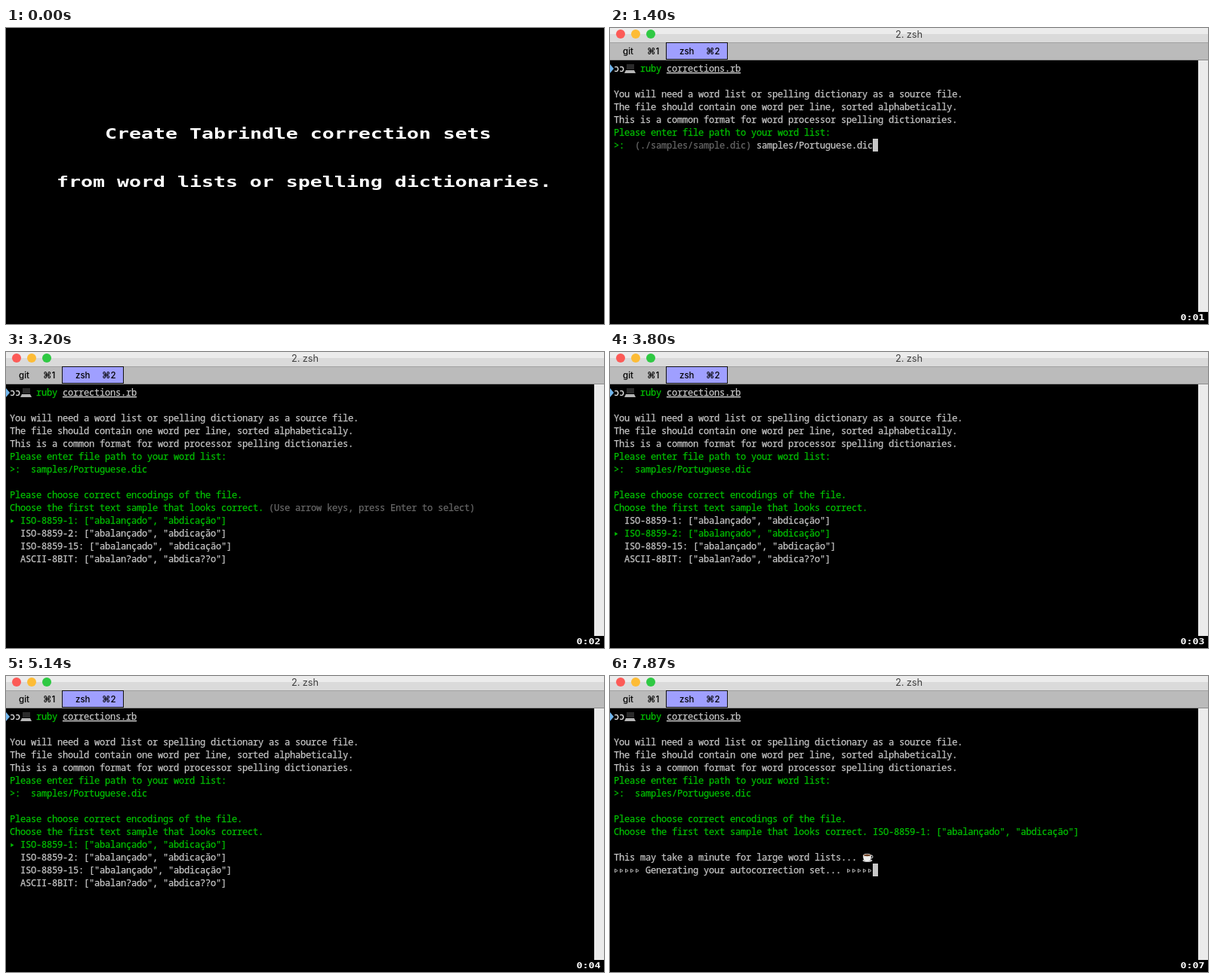
Animation, 792 px wide and 393 px high, one loop 8000 ms. Source, as an HTML page:

```html
<!DOCTYPE html>
<html lang="en">
<head>
<meta charset="utf-8">
<title>Correction sets</title>
<style>
  html, body { margin: 0; width: 100%; height: 100%; overflow: hidden; background: #000; }
  svg { display: block; width: 792px; height: 393px; }
  text { white-space: pre; }
  .mono { font: 12px "Noto Sans Mono", "DejaVu Sans Mono", monospace; letter-spacing: -.2px; font-variant-ligatures: none; }
  .mono text { stroke-width: .25px; }
  .pixel { font: bold 19.2px "DejaVu Sans Mono", monospace; fill: #fff; }
  .ui { font: 500 11.5px Inter, "DejaVu Sans", sans-serif; fill: #000; }
  .ui.title { font-size: 12.7px; font-weight: 400; fill: #404040; }
  .link { text-decoration: underline; }
</style>
</head>
<body>
<svg viewBox="0 0 792 393">
  <rect width="792" height="393"/>
  <g id="intro" class="pixel">
    <text transform="translate(131 147) scale(1.384 1)">Create Tabrindle correction sets</text>
    <text transform="translate(67 211) scale(1.384 1)">from word lists or spelling dictionaries.</text>
  </g>
  <g id="terminal">
    <rect width="792" height="8" fill="#ececec"/>
    <rect y="8" width="792" height="11" fill="#dadada"/>
    <rect y="19" width="792" height="24" fill="#bbb"/>
    <rect y="19" width="792" height="1" fill="#a2a2a2"/>
    <rect y="42" width="792" height="1" fill="#8c8c8c"/>
    <circle cx="14" cy="8" r="6" fill="#fc5b57"/>
    <circle cx="34" cy="8" r="6" fill="#fdbc36"/>
    <circle cx="54" cy="8" r="6" fill="#2fc943"/>
    <text class="ui title" x="396" y="13" text-anchor="middle">2. zsh</text>
    <rect x="74.5" y="19.5" width="81" height="22" fill="#9f9fff" stroke="#111"/>
    <g class="ui">
      <text x="17" y="35">git</text><text x="49" y="35">⌘1</text>
      <text x="92" y="35">zsh</text><text x="127" y="35">⌘2</text>
    </g>
    <rect x="779" y="43" width="13" height="334" fill="#ebebeb"/>
    <path d="M0 48L5 54L0 60Z" fill="#72b7ee"/>
    <g id="laptop">
      <path d="M22 48H32V55H22Z" fill="#2a2a2a"/>
      <path d="M21 56H32L34 60H19Z" fill="#b5b5b5"/>
    </g>
    <g id="screen" class="mono"></g>
    <text id="clock" class="pixel" transform="translate(755.5 388) scale(.692 .5)"></text>
  </g>
</svg>
<script>
const LOOP = 8000, CELL = 7, ROW = 17, LEFT = 5, TOP = 45;
const GREY = '#c7c7c7', GREEN = '#00c200', DIM = '#686868';
const PATH = 'samples/Portuguese.dic';
const ENCODINGS = [
  'ISO-8859-1: ["abalançado", "abdicação"]',
  'ISO-8859-2: ["abalançado", "abdicaçăo"]',
  'ISO-8859-15: ["abalançado", "abdicação"]',
  'ASCII-8BIT: ["abalan?ado", "abdica??o"]'
];

// [start ms, phase, selected encoding]
const PHASES = [
  [0, 'intro'], [500, 'ask'], [650, 'typed'], [2000, 'loading'],
  [3200, 'hint', 0], [3800, 'menu', 1], [4100, 'menu', 2], [4250, 'menu', 3],
  [4840, 'menu', 2], [4990, 'menu', 1], [5140, 'menu', 0], [5890, 'work']
];
const SECONDS = [0, 1400, 2450, 3350, 4390, 5440, 6460, 7450];
const SPIN_START = 5890, SPIN_STEP = 110, SPIN_FRAMES = 6;

const $ = id => document.getElementById(id);
const screen = $('screen');

function add(tag, attrs, content = '') {
  const el = document.createElementNS('http://www.w3.org/2000/svg', tag);
  for (const key in attrs) el.setAttribute(key, attrs[key]);
  el.textContent = content;
  screen.append(el);
}
const colX = col => LEFT + col * CELL;
const rowY = row => TOP + row * ROW;

function write(row, col, content, fill = GREY, cls = '') {
  add('text', { x: colX(col), y: rowY(row) + 13, fill, stroke: fill, class: cls }, content);
}
function cursor(row, col) {
  add('rect', { x: colX(col), y: rowY(row), width: CELL, height: ROW, fill: GREY });
}
function arrow(row, col, color, solid) {
  const x = colX(col) + 1.5, y = rowY(row) + 9.5;
  add('path', {
    d: `M${x} ${y - 2.2}L${x + 3.6} ${y}L${x} ${y + 2.2}Z`,
    fill: solid ? color : 'none', stroke: color, 'stroke-width': solid ? .4 : .9
  });
}
function coffee(row, col) {
  const x = colX(col), y = rowY(row);
  add('ellipse', { cx: x + 7, cy: y + 13, rx: 6.5, ry: 2, fill: '#bdbdbd' });
  add('circle', { cx: x + 12, cy: y + 8, r: 2, fill: 'none', stroke: '#e4e4e4' });
  add('path', { d: `M${x + 1} ${y + 6}H${x + 12}Q${x + 12} ${y + 14} ${x + 6.5} ${y + 14}T${x + 1} ${y + 6}Z`, fill: '#eee' });
  add('ellipse', { cx: x + 6.5, cy: y + 6, rx: 5, ry: 1.7, fill: '#6b3d20', stroke: '#eee', 'stroke-width': .8 });
}

function drawHeader() {
  write(0, 0, 'ɔɔ', '#e8e8e8');
  write(0, 5, 'ruby', GREEN);
  write(0, 10, 'corrections.rb', GREY, 'link');
  write(2, 0, 'You will need a word list or spelling dictionary as a source file.');
  write(3, 0, 'The file should contain one word per line, sorted alphabetically.');
  write(4, 0, 'This is a common format for word processor spelling dictionaries.');
  write(5, 0, 'Please enter file path to your word list:', GREEN);
  write(6, 0, '>:', GREEN);
}
function drawPathEntry(typed) {
  write(6, 4, '(./samples/sample.dic)', DIM);
  write(6, 27, typed);
  cursor(6, 27 + typed.length);
}
function drawQuestion() {
  write(8, 0, 'Please choose correct encodings of the file.', GREEN);
  write(9, 0, 'Choose the first text sample that looks correct.', GREEN);
}
function drawMenu(selected) {
  ENCODINGS.forEach((label, i) => {
    write(10 + i, 2, label, i === selected ? GREEN : GREY);
  });
  arrow(10 + selected, 0, GREEN, true);
}
function drawWork(spin) {
  write(9, 49, ENCODINGS[0], GREEN);
  write(11, 0, 'This may take a minute for large word lists...');
  coffee(11, 47);
  write(12, 6, 'Generating your autocorrection set...');
  for (const start of [0, 44])
    for (let i = 0; i < 5; i++) arrow(12, start + i, GREY, i === spin - 1);
  cursor(12, 49);
}

function draw(phase, selected, spin) {
  const intro = phase === 'intro';
  $('intro').style.display = intro ? '' : 'none';
  $('terminal').style.display = intro ? 'none' : '';
  screen.replaceChildren();
  if (intro) return;
  drawHeader();
  if (phase === 'ask') return drawPathEntry('');
  if (phase === 'typed') return drawPathEntry(PATH);
  write(6, 4, PATH, GREEN);
  if (phase === 'loading') return cursor(7, 0);
  drawQuestion();
  if (phase === 'work') return drawWork(spin);
  if (phase === 'hint') write(9, 49, '(Use arrow keys, press Enter to select)', DIM);
  drawMenu(selected);
}

const begin = performance.now();
let shown = '';
function tick() {
  const t = (performance.now() - begin) % LOOP;
  const [, phase, selected] = PHASES.findLast(([start]) => t >= start);
  const spin = phase === 'work' ? Math.floor((t - SPIN_START) / SPIN_STEP) % SPIN_FRAMES : 0;
  const key = [phase, selected, spin].join();
  if (key !== shown) draw(phase, selected, spin);
  shown = key;
  $('clock').textContent = '0:0' + SECONDS.findLastIndex(start => t >= start);
  requestAnimationFrame(tick);
}
tick();
</script>
</body>
</html>
```
